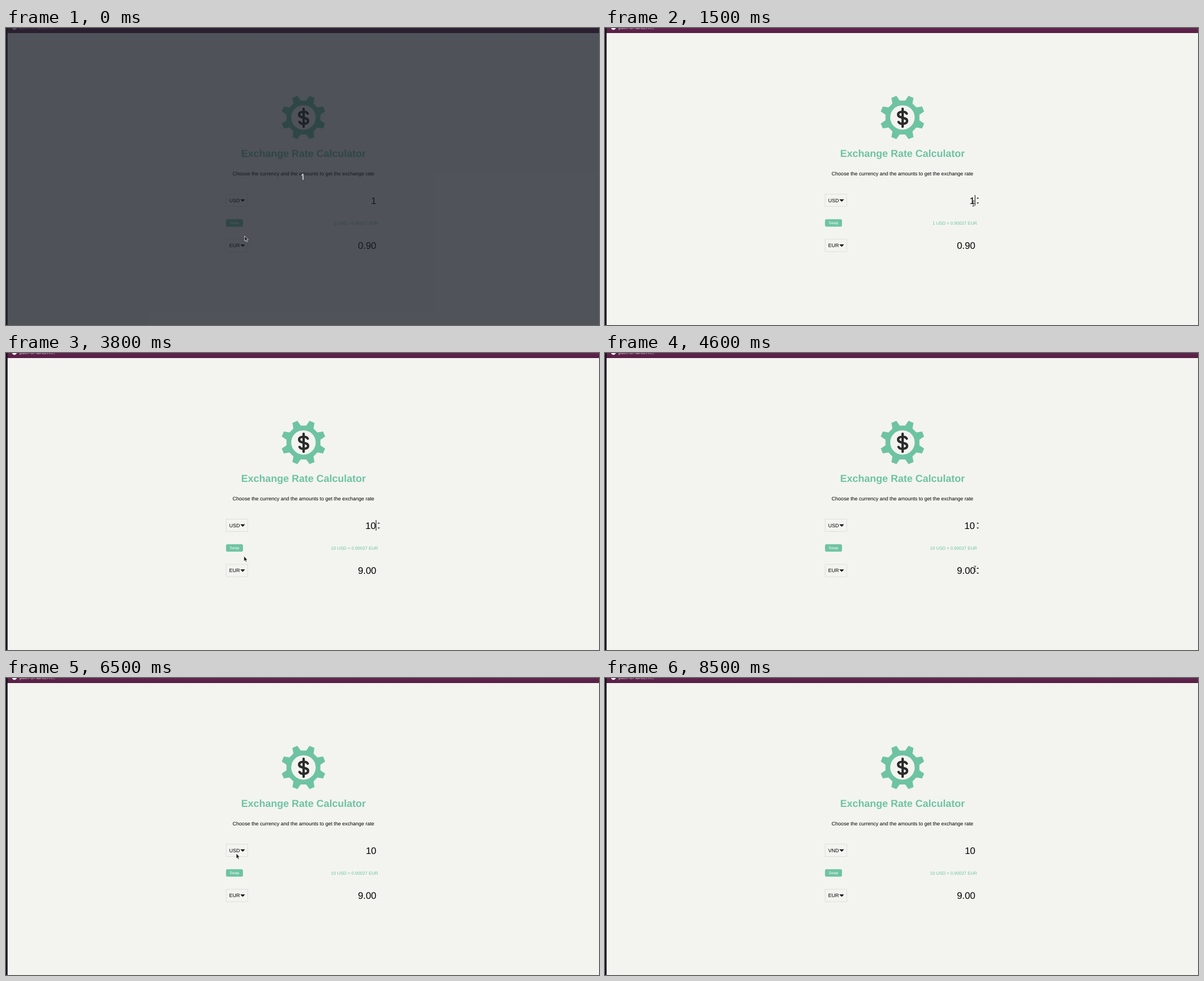
An HTML page for the animation above (8.7 s loop, 1056 by 530 pixels).

```html
<!DOCTYPE html>
<html lang="en">
<head>
<meta charset="utf-8">
<title>Exchange Rate Calculator</title>
<style>
  html, body { margin: 0; height: 100%; overflow: hidden; background: #f3f4ef; }
  svg { display: block; width: 1056px; height: 530px; }
  text { font: 9px "Liberation Sans", Arial, sans-serif; text-rendering: geometricPrecision; white-space: pre; }
  .green { fill: #6ec3a3; }
  .title { font-size: 18px; font-weight: bold; }
  .amount { font-size: 16.875px; text-anchor: end; }
  .rate { font-size: 7.875px; text-anchor: end; }
  .small { font-size: 6.75px; fill: #fff; }
  .ui { font-family: "Noto Sans", sans-serif; }
  .mid { text-anchor: middle; }
</style>
</head>
<body>
<svg viewBox="0 0 1056 530">
  <defs>
    <linearGradient id="purple" x2="0" y2="1">
      <stop offset="0" stop-color="#60264e"/>
      <stop offset="1" stop-color="#581e45"/>
    </linearGradient>
    <g id="spinner"><path d="M661.6 4.6h4.4l-2.2-2.4zM661.6 11.4h4.4l-2.2 2.4z" fill="#222"/></g>
    <g id="select">
      <rect x="392" y="296.5" width="38.5" height="22" fill="none" stroke="#dedede"/>
      <path d="M417.3 305.7h8.4l-4.2 4.3z"/>
    </g>
    <clipPath id="listClip"><rect x="392" y="69.5" width="38.5" height="226.5"/></clipPath>
  </defs>

  <rect width="1056" height="530" fill="#f3f4ef"/>
  <rect width="1056" height="9" fill="url(#purple)"/>
  <rect width="2.8" height="530" fill="#18131d"/>
  <circle cx="15" cy="-1" r="4.4" fill="#f4eef2"/>
  <text class="ui" x="24" y="2" style="font-size:8px" fill="#e6dce3">path-of-lantern...</text>

  <path id="gear" class="green"/>
  <circle cx="529.7" cy="159.7" r="21.8" fill="#f3f4ef"/>
  <g fill="none" stroke="#2b2b2b" stroke-width="4.2" stroke-linecap="round">
    <path d="M530 144.2V176.2"/>
    <path id="hook" d="M530 160.2C525 159 522 158 522 154.6S525 149.5 530 149.5S535.8 150.6 537.4 152.8"/>
    <use href="#hook" transform="rotate(180 530 160.2)"/>
  </g>

  <text class="green title mid" x="529.7" y="230">Exchange Rate Calculator</text>
  <text class="mid" x="529.7" y="262.8">Choose the currency and the amounts to get the exchange rate</text>

  <use href="#select"/>
  <use href="#select" y="80.6"/>
  <text id="from" x="397.6" y="310.7"></text>
  <text x="397.6" y="391.2">EUR</text>
  <text id="usd" class="amount" y="313.7"></text>
  <text id="eur" class="amount" y="394.2"></text>
  <rect class="green" x="391.8" y="341.2" width="30.2" height="13.4" rx="2.8"/>
  <text class="small mid" x="406.7" y="350.3">Swap</text>
  <text id="rate" class="green rate" x="662.5" y="350.8"></text>
  <use id="usdSpin" href="#spinner" y="300"/>
  <use id="eurSpin" href="#spinner" y="380.5"/>
  <rect id="caret" width="1" height="19"/>

  <g id="list">
    <rect x="392" y="69.5" width="38.5" height="226.5" fill="#fff"/>
    <g clip-path="url(#listClip)">
      <rect id="mark" x="392" width="30" height="11.4" fill="#45364f"/>
      <g id="rows"></g>
    </g>
    <rect x="422" y="69.5" width="8.5" height="226.5" fill="#f2f2f0"/>
    <rect id="thumb" x="423" width="6" height="81" fill="#bdbdbb"/>
    <path d="M424 75h4.4l-2.2-2.4zM424 290h4.4l-2.2 2.4z" fill="#333"/>
    <rect x="392" y="69.5" width="38.5" height="226.5" fill="none" stroke="#ad9cb8"/>
  </g>

  <g id="dim">
    <rect width="1056" height="530" fill="#1c202a" fill-opacity=".76"/>
    <text class="ui mid" x="528.5" y="270.5" style="font-size:15px" fill="#fff">1</text>
  </g>
  <g id="cursor">
    <path id="arrow" d="M0 0V9.2L2 7.4L3.5 10.6L5.1 9.9L3.6 6.8H6.3Z" fill="#171717" stroke="#fff" stroke-width=".7"/>
    <path id="beam" d="M-2 -4.6H2M0 -4.6V4.8M-2 4.8H2" fill="none" stroke="#444"/>
  </g>
</svg>
<script>
const LOOP = 8700, STEP = 100, ROW = 11.34, LIST_TOP = 68.5, LIST_END = 296, USD_ROW = 19;
const time = {
  live: 100, clickUsd: 500, clickEnd: 1500, type: 2600, pointerBack: 2800,
  clickEur: 4800, blur: 6300, open: 6600, choose: 7600, leave: 8500
};
// Where the pointer comes to rest: time, x, y
const stops = [
  [100, 425, 371], [600, 643, 303], [1100, 650, 308], [1500, 656, 313], [2400, 651, 330],
  [2900, 558.5, 347], [3500, 419, 362], [4600, 659, 385], [5100, 663, 387], [5800, 425, 378],
  [6400, 410, 313], [7200, 409, 306], [7500, 407, 277], [7900, 120, 66], [8300, 82, 2]
];
const currencies = ('MXN MYR NOK NZD PAB PEN PHP PKR PLN PYG RON RUB SAR SEK SGD ' +
  'THB TRY TWD UAH USD UYU VND ZAR').split(' ');

const $ = id => document.getElementById(id);
const show = (id, on) => $(id).style.display = on ? '' : 'none';
const set = (id, name, value) => $(id).setAttribute(name, value);

// Longer moves take longer; the pointer waits before each one.
function pointer(t) {
  const i = stops.findIndex(s => s[0] > t);
  if (i < 1) return stops.at(i).slice(1);
  const [t0, x0, y0] = stops[i - 1], [t1, x1, y1] = stops[i];
  const span = Math.min(t1 - t0, 150 + 3 * Math.hypot(x1 - x0, y1 - y0));
  const k = Math.max(0, 1 - (t1 - t) / span), ease = k * k * (3 - 2 * k);
  return [x0 + (x1 - x0) * ease, y0 + (y1 - y0) * ease];
}

function gearPath() {
  const points = [];
  for (let i = 0; i < 8; i++) {
    const a = (i + .5) * Math.PI / 4, c = Math.cos(a), s = Math.sin(a);
    for (const [r, w] of [[29.8, -7], [39.8, -4.8], [39.8, 4.8], [29.8, 7]])
      points.push([529.7 + r * c - w * s, 159.7 + r * s + w * c]);
  }
  return 'M' + points.join('L') + 'Z';
}

function drawFields(t, x, y) {
  const typed = t >= time.type, amount = typed ? '10' : '1';
  const usdFocus = t >= time.clickUsd && t < time.clickEur;
  const eurFocus = t >= time.clickEur && t < time.blur;
  const hover = top => t >= time.live && x > 421 && x < 672 && y > top && y < top + 36 &&
    !(x < 431 && y > top + 6 && y < top + 29);
  const overUsd = hover(290), overEur = hover(370.5);

  $('from').textContent = t < time.choose ? 'USD' : 'VND';
  $('usd').textContent = amount;
  $('eur').textContent = typed ? '9.00' : '0.90';
  $('rate').textContent = amount + ' USD = 0.90027 EUR';
  set('usd', 'x', usdFocus ? 658.7 : 659.5);
  set('eur', 'x', eurFocus ? 658.7 : 659.5);
  show('usdSpin', usdFocus || overUsd);
  show('eurSpin', eurFocus || overEur);

  // Each click or key restarts the caret's blink.
  const since = [time.clickEur, time.type, time.clickEnd, time.clickUsd].find(c => c <= t);
  show('caret', (usdFocus || eurFocus) && (t - since) % 1200 < 600);
  set('caret', 'x', t < time.clickEnd ? 650 : 658.5);
  set('caret', 'y', eurFocus ? 379 : 298);
  return (overUsd || overEur) && x < 661;
}

function drawList(t, y) {
  const inside = y < LIST_END, scroll = inside ? 3 : 0;
  const row = inside ? Math.floor((y - LIST_TOP) / ROW) : USD_ROW;
  show('list', t >= time.open && t < time.choose);
  set('rows', 'transform', `translate(0 ${-scroll * ROW})`);
  [...$('rows').children].forEach((item, i) =>
    item.setAttribute('fill', i === row + scroll ? '#d5c3dc' : '#111'));
  set('mark', 'y', LIST_TOP + row * ROW);
  set('thumb', 'y', 194 + scroll * 4);
}

function draw(t) {
  const [x, y] = pointer(t);
  const beam = drawFields(t, x, y);
  drawList(t, y);
  show('dim', t < time.live);
  show('cursor', t < time.type || t >= time.pointerBack && t < time.leave);
  show('beam', beam);
  show('arrow', !beam);
  set('cursor', 'transform', `translate(${x} ${y})`);
}

set('gear', 'd', gearPath());
$('rows').innerHTML = currencies.map((c, i) => `<text x="398" y="${77.3 + i * ROW}">${c}</text>`).join('');

const start = performance.now();
function tick() {
  const t = (performance.now() - start) % LOOP;
  draw(Math.floor(t / STEP) * STEP);
  requestAnimationFrame(tick);
}
tick();
</script>
</body>
</html>
```
